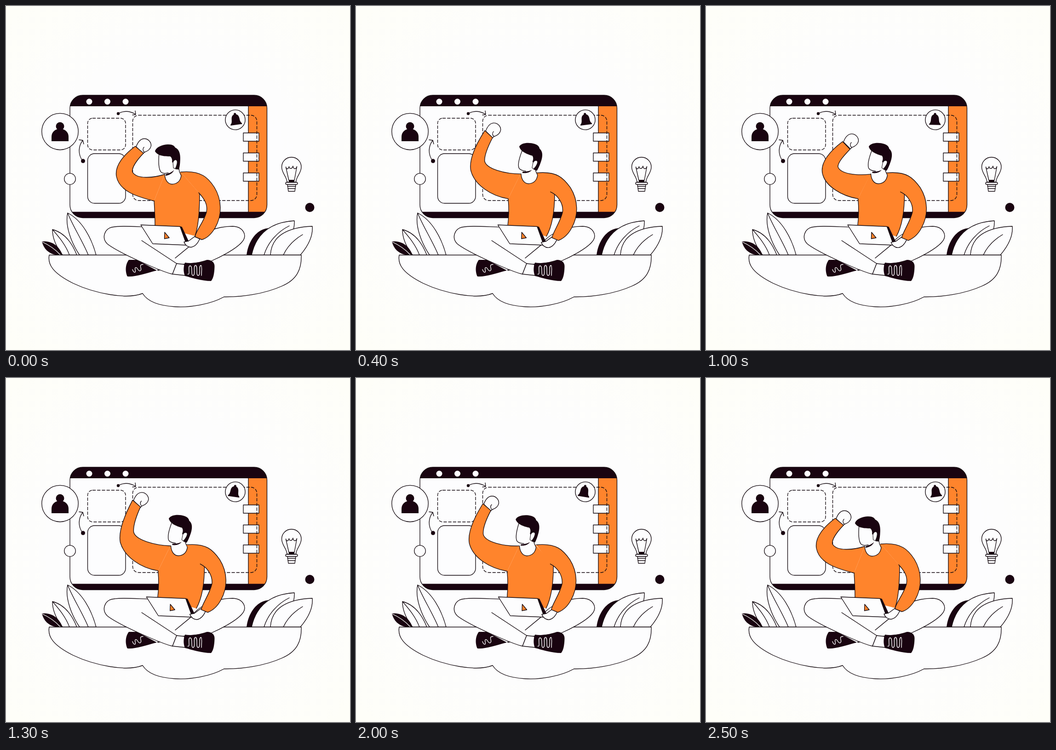
Write an HTML page that moves like this. It is 748x748 px and loops after 2550 ms.

```html
<!DOCTYPE html>
<html lang="en">
<head>
<meta charset="utf-8">
<title>Creator at work</title>
<style>
  html, body { margin: 0; width: 100%; height: 100%; overflow: hidden; background: #fdfdfd; }
  svg { display: block; width: 100vw; height: 100vh; }
  .line { fill: none; }
  .dark { fill: #190410; stroke: none; }
  .orange { fill: #ff842c; }
  .dash { fill: none; stroke-dasharray: 6.2 4; }
  .lace { fill: none; stroke: #fff; }
  .bare { stroke: none; }
</style>
</head>
<body>
<svg viewBox="0 0 748 748" fill="#fdfdfe" stroke="#140a10" stroke-width="1.35" stroke-linejoin="round" stroke-linecap="round">
  <defs>
    <radialGradient id="paper" r=".75">
      <stop offset=".4" stop-color="#fdfdfe"/>
      <stop offset="1" stop-color="#fefef7"/>
    </radialGradient>
    <clipPath id="frame"><rect x="139" y="194" width="428.5" height="266.5" rx="28"/></clipPath>
  </defs>
  <rect class="bare" width="748" height="748" fill="url(#paper)"/>

  <!-- browser window -->
  <g clip-path="url(#frame)">
    <rect class="bare" x="139" y="194" width="429" height="267"/>
    <rect class="orange" x="527" y="210" width="50" height="245"/>
    <path class="dark" d="M139 194H568V218H139ZM139 447.5H568V461H139Z"/>
  </g>
  <rect class="line" x="139" y="194" width="428.5" height="266.5" rx="28"/>
  <g class="bare">
    <circle cx="181" cy="208" r="6.5"/><circle cx="220.5" cy="208" r="6.5"/><circle cx="260" cy="208" r="6.5"/>
  </g>
  <rect class="dash" x="177.5" y="244" width="82.5" height="69" rx="11"/>
  <rect class="line" x="177.5" y="321" width="82.5" height="108" rx="15"/>
  <path d="M516 276h34v18h-34zM516 319.500h34v18h-34zM516 363h34v18h-34z"/>
  <rect class="dash" x="275.5" y="237.500" width="270" height="185.500" rx="13"/>
  <path class="line" d="M244 234Q262 224 281 235M281 228L282 236L275 237"/>
  <circle class="dark" cx="244" cy="234" r="3.2"/>
  <circle cx="139" cy="376" r="12.2"/>

  <!-- badges -->
  <circle cx="117.5" cy="273" r="39.7"/>
  <circle class="dark" cx="117.500" cy="261.500" r="9"/>
  <path class="dark" d="M99 294V284C99 275 106 267 117.500 267S136 275 136 284V294Z"/>
  <path class="line" d="M167 337C156 323 157 305 167 292M159 291L167 292L169 300"/>
  <circle class="dark" cx="167.500" cy="337" r="4.5"/>
  <circle cx="498.500" cy="247.500" r="21.600"/>
  <g id="bell" class="dark">
    <circle cx="498" cy="235" r="2.6"/>
    <path d="M485.500 258.500V256.500C489 254 489 250 489.500 245C490 238 494 235.500 498 235.500S506 238 506.500 245C507 250 507 254 510.500 256.500V258.500Z"/>
  </g>

  <!-- bulb -->
  <path d="M611 383C611 371 599.500 364 599.500 350A21.250 21.250 0 0 1 642 350C642 364 630.500 371 630.500 383Z"/>
  <path class="line" d="M615 379L608.500 350C610 356 614 355 615.500 349C616 355 622 355 624 348C625 356 631 355 632.500 349L627 379"/>
  <path class="dark" d="M615 378H627V384H615Z"/>
  <path d="M612 388H630L628 403H614Z"/>
  <path class="line" d="M612 392H630M613 397H629"/>
  <rect x="608" y="383.500" width="26" height="4.500" rx="2.200"/>
  <circle class="dark" cx="660.500" cy="438" r="10"/>

  <!-- leaves -->
  <path d="M134 450C128 478 142 515 160 541.500H196C186 505 166 466 134 450C146 480 166 510 179 541.500"/>
  <path d="M101 486C101 508 111 526 123 541.500H154C144 516 128 493 101 486C116 503 130 520 138 541.500"/>
  <path class="dark" d="M78 512C96 510 114 518 123 541.500H109C92 538 82 528 78 512Z"/>
  <path class="lace" d="M79 513C94 520 108 530 118 541"/>
  <path class="dark" d="M523 541.500C527 510 546 483 574 483L545 541.500Z"/>
  <path d="M534 541.500C544 495 576 470 627 467C628 490 615 520 596 541.500Z"/>
  <path class="line" d="M616 478C592 490 570 512 561 541.500"/>
  <path d="M575 541.500C577 500 612 481 666 479C668 503 655 524 640 541.500Z"/>
  <path class="line" d="M645 497C628 507 612 522 603 541.500"/>

  <!-- ground -->
  <path d="M94 541.500H642C643 572 633 595 600 609C560 627 510 633 474 632.500C444 649 400 656 368 654C335 652 308 643 297 625C262 639 193 625 146 603C102 581 90 562 94 541.500Z"/>

  <!-- legs -->
  <path d="M340 530L368 548L402 520C420 492 460 479 493 479C517 480 525 500 514 512C502 528 464 547 443 556L380 562L330 575Z"/>
  <path class="dark" d="M267 552C258 564 260 580 264 588C278 590 302 582 328 575L285 552Z"/>
  <path class="lace" d="M275 573C278 581 283 581 281 574C279 567 284 567 287 573C291 579 295 575 293 569C291 562 295 562 298 562"/>
  <path class="bare" d="M300 479L420 492L402 520L368 549L330 535Z"/>
  <path d="M295 510L371 560L362 583C342 579 245 537 220 517C207 504 215 484 230 481C250 477 280 480 330 481"/>
  <path class="line" d="M368 548L402 520"/>
  <path d="M371 560L388 562L390 586L362 583Z"/>
  <path class="dark" d="M389 558C408 561 424 556 437 552C449 552 454 559 453.500 567C453 582 451 592 446 598C425 598 405 591 389 587C385 576 386 567 389 558Z"/>
  <path class="lace" d="M395 583C402 586 394 566 400 565C407 564 401 587 407 586C413 585 406 565 412 564C418 564 412 587 418 586C424 586 418 564 424 564C427 565 425 578 425 586"/>

  <!-- torso and raised arm -->
  <g id="fist">
    <path d="M283 306C287 295 293 289 300 288.500C310 288 316 297 315.500 304C314 312 307 316 301 318L298 321Z"/>
    <path class="line" d="M301 318C297 315 297 310 300 307"/>
  </g>
  <path id="chest" class="orange bare"/>
  <path id="sides" class="line"/>
  <path id="arm" class="orange"/>
  <g id="collar">
    <path class="bare" d="M345 366L350 362L364 350L376 353L378 361L381 369C379 381 372 387 361 387.500C352 387 346 379 345 366Z"/>
    <path class="line" d="M345 366C346 379 352 387 361 387.500C372 387 379 381 381 369L377 360L376 354"/>
  </g>

  <!-- head -->
  <g id="head">
    <path class="bare" d="M333 319C331 340 332 355 337 361C343 366 356 363 364 358L374 353L372 325Z"/>
    <path class="line" d="M333 319C331 340 332 355 337 361C341 365 348 364 353 363"/>
    <path class="dark" d="M347 366C355 364 361 361 365 357C363 363 356 368 347 369Z"/>
    <path class="dark" d="M324 316C326 306 343 300.500 354 301C362 301 366 304 368 308C378 312 380 325 378.500 340C378 347 377 352 376 355.500L369 355C366 350 366 343 361 339C362 334 360 329 357 327C345 327 330 326 324 316Z"/>
    <path d="M363 341C364 335 370 332 372 337C373 343 370 350 368 354L364 352Z" stroke-width="1"/>
  </g>

  <!-- laptop -->
  <g id="laptop">
    <path class="dark" d="M377 479L382.500 480L397.500 512L391 514Z"/>
    <path d="M293 476L378.500 479.500L393 520L319 517Z"/>
    <path class="orange" d="M345 492L355 504L344.500 506Z"/>
  </g>
  <path id="hand" d="M412 500L397 511L387 513C390 521 397 525 403 524.500C411 523 417 516 421 507Z"/>
  <path id="sleeve" class="orange"/>
</svg>
<script>
const LOOP = 2550, CYCLE = 2500;
const el = id => document.getElementById(id);

// [time, value] keys joined by cosine easing
const leanKeys = [[0, 0], [430, 1], [1200, .95], [1720, 1.05], [2500, 0]];
const bendKeys = [[0, 1], [440, .17], [950, 1], [1290, 0], [1700, 1], [2090, .08], [2500, 1]];
const typeKeys = [[0, 0], [450, .93], [750, 1], [1300, .72], [1750, .97], [2080, .97], [2500, 0]];

const armBent = 'M322 424 C282 414 246 402 240 370 C236 346 258 322 281 305 L299 320 C285 335 273 350 275 361 C284 377 320 374 345 366';
const armLeaning = 'M331 419 C296 413 260 392 254 364 C249 340 272 315 299 296 L315 313 C303 325 288 340 288 350 C293 365 325 369 358 366';
const armRaised = 'M331 419 C294 413 258 389 249 357 C244 332 260 295 276 265 L293 280 C284 300 277 320 278 334 C281 352 325 364 358 365';
const sleeveRest = 'M380 361 C425 357 440 374 453 394 C470 422 470 455 455 482 C446 497 437 505 426 508 L411 502 C412 490 430 470 436 448 C439 432 432 420 419 406';
const sleeveLeaning = 'M394 363 C438 359 452 374 467 395 C484 422 485 455 470 482 C463 496 453 505 441 510 L427 504 C429 492 445 470 450 448 C452 430 440 411 423 404';
const chestRest = 'M322 424 L345 366 L380 361 L421 408 C421 450 418 480 411 500 L324 478 C324 455 323 440 322 424';
const chestLeaning = 'M331 419 L358 365 L394 363 L432 408 C432 450 426 480 414 501 L330 478 C333 455 333 440 331 419';
const sidesRest = 'M322 424 C323 440 324 455 324 478 M421 408 C421 450 418 480 411 500';
const sidesLeaning = 'M331 419 C333 440 333 455 330 478 M432 408 C432 450 426 480 414 501';

function ease(keys, t) {
  const i = keys.findIndex((key, n) => n && t <= key[0]);
  const [t0, a] = keys[i - 1], [t1, b] = keys[i];
  return a + (b - a) * (1 - Math.cos(Math.PI * (t - t0) / (t1 - t0))) / 2;
}

const numbers = path => path.match(/\d+/g).map(Number);

// base + amount * (to - from), point by point
function blend(base, ...shifts) {
  const parts = shifts.map(([from, to, amount]) => [numbers(from), numbers(to), amount]);
  let i = 0;
  return base.replace(/\d+/g, n => {
    const v = parts.reduce((sum, [from, to, amount]) => sum + amount * (to[i] - from[i]), +n);
    i++;
    return v.toFixed(2);
  });
}

const morph = (id, ...args) => el(id).setAttribute('d', blend(...args));
const move = (id, x, y, more = '') => el(id).setAttribute('transform', `translate(${x} ${y}) ${more}`);

function draw(now) {
  const t = Math.min(now % LOOP, CYCLE);
  const lean = ease(leanKeys, t), lift = 1 - ease(bendKeys, t), type = ease(typeKeys, t);

  morph('arm', armBent, [armBent, armLeaning, lean], [armLeaning, armRaised, lift]);
  morph('chest', chestRest, [chestRest, chestLeaning, lean]);
  morph('sides', sidesRest, [sidesRest, sidesLeaning, lean]);
  morph('sleeve', sleeveRest, [sleeveRest, sleeveLeaning, (lean + type) / 2]);

  move('fist', 18 * lean - 23 * lift, -9 * lean - 31 * lift);
  move('collar', 14 * lean, -lean);
  move('head', 15.5 * lean, -lean, `rotate(${17 * lean} 364 364)`);
  move('laptop', 17 * type, 0);
  move('hand', 17.500 * type, type);

  const swing = 1 - 9 * Math.cos(2 * Math.PI * (7 * t / CYCLE - .05));
  move('bell', 0, 0, `rotate(${swing} 498 237)`);
  requestAnimationFrame(tick);
}

const start = performance.now();
function tick() { draw(performance.now() - start); }
tick();
</script>
</body>
</html>
```
